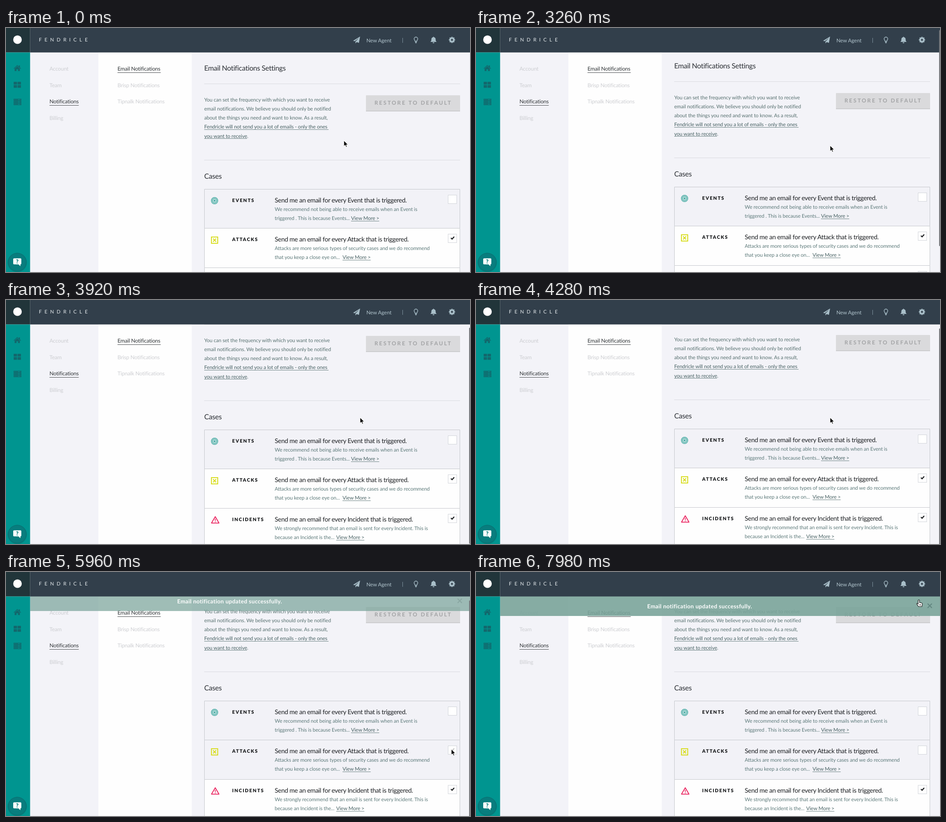
Recreate the animation shown at these times as an HTML page. Size 1030x544 px, loop 8 s.

```html
<!DOCTYPE html>
<html lang="en">
<head>
<meta charset="utf-8">
<title>Notification settings</title>
<style>
html, body { margin: 0; width: 100%; height: 100%; overflow: hidden; background: #f3f3f8; }
svg { display: block; width: 100%; height: 100%; }
text { font-family: Lato, sans-serif; text-rendering: geometricPrecision; }
.brand { font-size: 11px; letter-spacing: 6.2px; fill: #e6ecee; }
.agent { font-size: 11.6px; letter-spacing: -.1px; fill: #b2c5ce; }
.nav { font-size: 12px; letter-spacing: -.2px; fill: #cdced2; }
.on { fill: #303437; }
.head { font-size: 15.8px; letter-spacing: -.33px; fill: #2a2e33; }
.body { font-size: 11.3px; letter-spacing: -.11px; fill: #587170; }
.desc { font-size: 11.3px; letter-spacing: -.12px; fill: #5d7a7a; }
.link { fill: #466062; }
.title { font-size: 14.2px; letter-spacing: -.37px; fill: #1c1f22; }
.kind { font-size: 10.5px; font-weight: 900; letter-spacing: 1.7px; fill: #17191b; }
.button { font-size: 12px; font-weight: 700; letter-spacing: 2.56px; fill: #a2a3a5; }
.note { font-size: 12.6px; font-weight: 700; letter-spacing: .33px; fill: #fff; }
</style>
</head>
<body>
<svg id="stage" viewBox="0 0 1030 544" preserveAspectRatio="none"></svg>
<script>
const LOOP = 8000;
const stage = document.getElementById('stage');

const rect = (x, y, w, h, fill, extra = '') =>
  `<rect x="${x}" y="${y}" width="${w}" height="${h}" fill="${fill}" ${extra}/>`;
const text = (x, y, cls, s) => `<text x="${x}" y="${y}" class="${cls}">${s}</text>`;
const path = (d, stroke, width = 1, fill = 'none', extra = '') =>
  `<path d="${d}" fill="${fill}" stroke="${stroke}" stroke-width="${width}" ${extra}/>`;
const circle = (x, y, r, fill, extra = '') =>
  `<circle cx="${x}" cy="${y}" r="${r}" fill="${fill}" ${extra}/>`;
const rule = (x, y, w, color) => rect(x, y, w, 1, color);

// Left columns
const account = ['Account', 'Team', 'Notifications', 'Billing'];
const channels = ['Email', 'Brisp', 'Tipnalk'].map(s => s + ' Notifications');
const menu = (items, x, active, width) => items.map((s, i) => {
  const y = 95 + Math.round(i * 36.5);
  return text(x, y, i === active ? 'nav on' : 'nav', s) +
    (i === active ? rule(x, y + 4, width, '#4a4d50') : '');
}).join('');

// Settings table
const icons = [
  circle(463, 385, 7.3, '#a9d7d4', 'stroke="#57b0aa" stroke-width="1.4"') +
    circle(463, 385, 4.6, '#c3e4e2', 'stroke="#57b0aa" stroke-width="1.4"') +
    circle(463, 385, 2.2, '#57b0aa'),
  path('M456 379h14v14h-14zM459.5 382.5l7 7m0-7l-7 7', '#d8dd22', 2),
  path('M464.5 378l8.3 14.3h-16.6z', '#ea1f5c', 1.8, 'none', 'stroke-linejoin="round"') +
    path('M464.5 382.8v4.7m0 1.2v1.7', '#ea1f5c', 1.7)
];
const cases = [
  ['Event', 'We recommend not being able to receive emails when an Event is',
    'triggered . This is because Events...', 766],
  ['Attack', 'Attacks are more serious types of security cases and we do recommend',
    'that you keep a close eye on...', 747],
  ['Incident', 'We strongly recommend that an email is sent for every Incident. This is',
    'because an Incident is the...', 733]
];
const row = ([name, line1, line2, linkX], i) => `
  <g transform="translate(0 ${Math.floor(i * 87.5)})">
    ${rect(440, 359, 568, 88, i ? '#fefefe' : '#f2f2f7', `id="row${i}"`)}
    ${path('M440.5 447V359.5H1007.5V447', '#c5c7cc')}
    ${icons[i]}
    ${text(502, 388, 'kind', name.toUpperCase() + 'S')}
    ${text(596.5, 388.5, 'title', `Send me an email for every ${name} that is triggered.`)}
    ${text(596.5, 408, 'desc', line1)}
    ${text(596.5, 428, 'desc', line2)}
    ${text(linkX, 428, 'desc link', 'View More &gt;')}
    ${rule(linkX, 430, 62.5, '#6f8586')}
    ${rect(981.5, 372.5, 19, 19, '#fff', 'stroke="#d2d5da"')}
    ${i ? path('M987.6 381l2.6 2.5 4.8-5.2', '#1d1f21', 2.3, 'none', `id="check${i}"`) : ''}
  </g>`;

const intro = [
  'You can set the frequency with which you want to receive',
  'email notifications. We believe you should only be notified',
  'about the things you need and want to know. As a result,',
  '<tspan class="link">Fendricle will not send you a lot of emails - only the ones</tspan>',
  '<tspan class="link">you want to receive</tspan>.'
].map((s, i) => text(440, 163.5 + i * 20.3, 'body', s)).join('');

const content = `
  <g id="content">
    ${text(440, 95, 'head', 'Email Notifications Settings')}
    ${rule(440, 124, 568, '#d9dae0')}
    ${intro}
    ${rule(440, 226, 276, '#6f8586')}${rule(440, 246, 95, '#6f8586')}
    ${rect(799, 150, 209, 36, '#dadadc', 'rx="1"')}${rect(799, 184.5, 209, 1.5, '#c7c8ca')}
    ${text(818, 171, 'button', 'RESTORE TO DEFAULT')}
    ${rule(440, 294, 568, '#d9dae0')}
    ${text(440, 335.5, 'head', 'Cases')}
    ${cases.map(row).join('')}
  </g>`;

const banner = `
  <g id="banner">
    ${rect(53.5, 54, 976.5, 44, '#7ba59b', 'opacity=".9"')}
    ${text(380, 80.5, 'note', 'Email notification updated successfully.')}
    ${path('M1002.5 70.5l9.5 9.5m0-9.5l-9.5 9.5', '#587a75', 2, 'none', 'id="close"')}
  </g>`;

// Header and sidebar
const tint = '#a9bfc9';
const teeth = [...Array(8)].map((_, i) =>
  `<rect x="-1.6" y="-6.8" width="3.2" height="4" transform="rotate(${i * 45})"/>`).join('');
const header = `
  ${rect(53.5, 0, 976.5, 54.5, '#323f4b')}
  ${rect(0, 0, 53.5, 54.5, '#21353a')}
  ${circle(25.5, 26, 9.5, '#fff')}
  ${text(73, 30, 'brand', 'FENDRICLE')}
  ${path('M770.5 28.5L786 19l-2.6 14.2-5-2-2.6 3.4v-4.4l8.2-8.6-9.8 7.9z', 'none', 0, tint)}
  ${text(800, 32, 'agent', 'New Agent')}
  ${rect(880, 22, 1, 11, '#7f929d')}
  ${path('M908 29.5c0-2-2-2.8-2-5.2a4 4 0 0 1 8 0c0 2.4-2 3.2-2 5.2zM908 31.5h4m-3.2 1.8h2.4', tint, 1.4)}
  ${path('M942 31c2-1.5 2.3-3 2.3-6 0-2.6 1.7-4.1 3.9-4.5v-1h1.6v1c2.2.4 3.9 1.9 3.9 4.5 0 3 .3 4.5 2.3 6zM947 32h4a2 2 0 0 1-4 0z', 'none', 0, tint)}
  <g transform="translate(990 26.5)" fill="${tint}">
    ${teeth}<circle r="3.7" fill="none" stroke="${tint}" stroke-width="3"/>
  </g>`;

const dark = '#12686c';
const chat = '#087d7e';
const server = y => rect(17.6, y, 15.8, 3.2, 'none', `stroke="${dark}" stroke-width="1.3"`) +
  rect(19, y + 1, 8, 1.3, dark) + rect(30, y + 1, 2, 1.3, dark);
const sidebar = `
  ${rect(0, 54.5, 53.5, 490, '#009590')}
  ${path('M17 90l8-7.5 3.5 3.2V83.5h2.5v4.5l2.3 2-.9 1-7.4-6.7-7.3 6.7zM19.2 90.5l5.800-5.2 5.8 5.2V96h-4.2v-4h-3.2v4h-4.2z', 'none', 0, dark)}
  ${[17, 25.7].map(x => [120, 127.3].map(y => rect(x, y, 7.5, 6, dark)).join('')).join('')}
  ${[158.5, 163.3, 168.1].map(server).join('')}
  ${circle(25, 523, 21.5, '#04595c', 'opacity=".3"')}
  ${circle(25, 522, 20, chat, 'stroke="#0a6d6f"')}
  ${path('M18 513.5h14q2 0 2 2v9.5q0 2-2 2v4l-4.5-4H18q-2 0-2-2v-9.5q0-2 2-2z', 'none', 0, '#fff')}
  <text x="25" y="524.5" text-anchor="middle" font-size="12.5" font-weight="900" fill="${chat}">?</text>`;

const cursors = `
  ${path('M0 0V12.5L3 10 5 14.5 7 13.6 5.1 9.3H9z', '#fff', 1, '#000', 'id="arrow"')}
  ${path('M-1.5 1a1.5 1.5 0 0 1 3 0v4.5l5 1.2c1.3.3 1.5 1 1.3 2.2l-.9 5.6H-.8L-4.6 9c-.8-1.3.6-2.2 1.6-1.3l1.5 1.5zM2 9.5v2.5M4.3 9.5v2.5', '#111', 1.1, '#fff', 'id="hand"')}`;

stage.innerHTML =
  rect(0, 0, 1030, 544, '#f3f3f8') + rect(205, 54, 207.5, 490, '#fefefe') +
  menu(account, 96.5, 2, 65) + menu(channels, 247.5, 0, 96) +
  content + banner + header + sidebar +
  rect(1028, 0, 4, 482, '#74777b', 'rx="2" id="bar"') + cursors;

// Held steps: [time, values...]
// scroll offset, scrollbar opacity
const scrolls = [[0, 0, 0], [3260, 5, 1], [3380, 15, 1], [3560, 34, 1], [3740, 53, 1],
  [3920, 70, 1], [4100, 72, 1], [6140, 72, 0]];
const pointer = [
  [0, 750, 251, 'arrow'], [210, 732, 111, 'arrow'], [390, 0, 0, ''],
  [2480, 684, 91, 'arrow'], [2660, 762, 190, 'arrow'], [2840, 786, 262, 'arrow'],
  [4790, 957, 332, 'arrow'], [4960, 984, 383, 'arrow'], [5080, 988, 391, 'hand'],
  [5780, 988.5, 395, 'arrow'], [6860, 988, 382, 'arrow'], [6980, 990, 345, 'arrow'],
  [7100, 994, 290, 'arrow'], [7210, 998, 230, 'arrow'], [7330, 1000, 180, 'arrow'],
  [7440, 1001, 152, 'arrow'], [7770, 1002, 132, 'arrow'], [7875, 995, 92, 'arrow'],
  [7980, 983, 62.5, 'hand']
];
// check opacity, row fill
const unchecks = [[0, 1, '#fefefe'], [5670, .85, '#fafafc'], [5780, .6, '#f6f6fa'],
  [5960, .25, '#f2f2f7'], [6140, 0, '#f2f2f7']];
// banner opacity, offset, close icon opacity
const notices = [[0, 0, -44, 0], [5960, .8, -11, .5], [6140, 1, 0, .8]];

const held = (steps, t) => steps.findLast(s => s[0] <= t).slice(1);
const set = (id, attrs) => {
  const el = document.getElementById(id);
  for (const k in attrs) el.setAttribute(k, attrs[k]);
};

function draw(t) {
  const [scroll, barAlpha] = held(scrolls, t);
  set('content', { transform: `translate(0 ${-scroll})` });
  set('bar', { y: scroll * .88, opacity: barAlpha });

  const [checkAlpha, rowFill] = held(unchecks, t);
  set('check1', { opacity: checkAlpha });
  set('row1', { fill: rowFill });

  const [noteAlpha, noteY, closeAlpha] = held(notices, t);
  set('banner', { opacity: noteAlpha, transform: `translate(0 ${noteY})` });
  set('close', { opacity: closeAlpha });

  const [x, y, shape] = held(pointer, t);
  for (const id of ['arrow', 'hand'])
    set(id, { transform: `translate(${x} ${y})`, opacity: id === shape ? 1 : 0 });
}

const start = performance.now();
function tick() {
  draw((performance.now() - start) % LOOP);
  requestAnimationFrame(tick);
}
tick();
</script>
</body>
</html>
```
